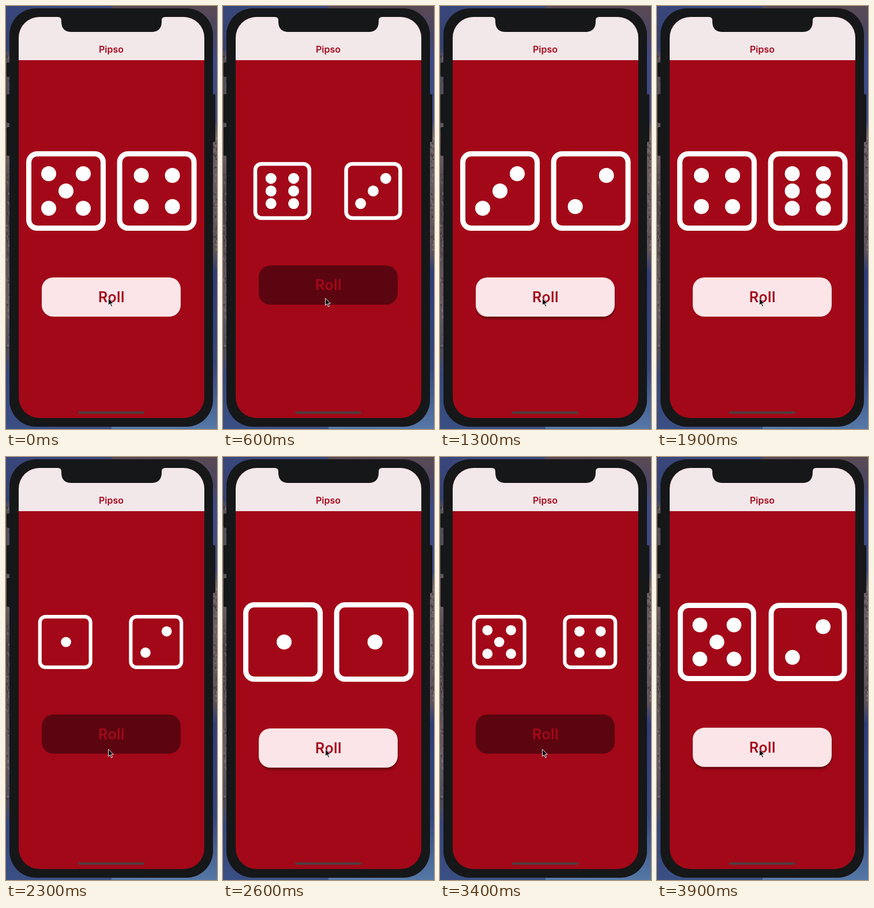
An HTML page that plays this animation: 366 by 734 pixels, repeating every 4 s.

```html
<!DOCTYPE html>
<html lang="en">
<head>
<meta charset="utf-8">
<title>Dice roller</title>
<style>
  html, body { margin: 0; width: 100%; height: 100%; overflow: hidden; background: #161718; }
  svg { display: block; width: 100vw; height: 100vh; }
  text { font-family: Inter, Roboto, "Liberation Sans", sans-serif; font-weight: 600; text-anchor: middle; fill: #a5081b; }
</style>
</head>
<body>
<svg viewBox="0 0 366 734" xmlns="http://www.w3.org/2000/svg">
  <defs>
    <linearGradient id="left" x2="0" y2="1">
      <stop offset="0" stop-color="#3a477c"/>
      <stop offset=".1" stop-color="#34406f"/>
      <stop offset=".12" stop-color="#55525c"/>
      <stop offset=".27" stop-color="#4c4a55"/>
      <stop offset=".3" stop-color="#77696f"/>
      <stop offset=".45" stop-color="#4a4248"/>
      <stop offset=".7" stop-color="#655c64"/>
      <stop offset=".82" stop-color="#4d4a5c"/>
      <stop offset=".87" stop-color="#35467f"/>
      <stop offset="1" stop-color="#3a4f84"/>
    </linearGradient>
    <linearGradient id="right" x2="0" y2="1">
      <stop offset="0" stop-color="#5a4a54"/>
      <stop offset=".06" stop-color="#4a4664"/>
      <stop offset=".12" stop-color="#3d4a86"/>
      <stop offset=".27" stop-color="#3f4a80"/>
      <stop offset=".3" stop-color="#6f6168"/>
      <stop offset=".58" stop-color="#5e535c"/>
      <stop offset=".63" stop-color="#2f3d78"/>
      <stop offset=".85" stop-color="#35477f"/>
      <stop offset="1" stop-color="#5578a6"/>
    </linearGradient>
    <clipPath id="screen"><rect x="22" y="19" width="322" height="696" rx="36"/></clipPath>
    <filter id="blur" x="-10%" y="-30%" width="120%" height="160%"><feGaussianBlur stdDeviation="2"/></filter>
  </defs>

  <rect width="183" height="734" fill="url(#left)"/>
  <rect x="183" width="183" height="734" fill="url(#right)"/>
  <g id="rock"></g>

  <g fill="#161718">
    <rect x="1" y="98" width="8" height="25" rx="2"/>
    <rect x="1" y="153" width="8" height="50" rx="2"/>
    <rect x="1" y="210" width="8" height="50" rx="2"/>
    <rect x="355" y="153" width="8" height="83" rx="2"/>
    <rect x="6" y="4" width="353" height="726" rx="46"/>
  </g>

  <g clip-path="url(#screen)">
    <rect x="22" y="19" width="322" height="696" fill="#a20818"/>
    <rect x="22" y="19" width="322" height="75" fill="#f2e7e9"/>
    <path d="M90 18v1q6 0 6 6v2q0 18 18 18h138q18 0 18-18v-2q0-6 6-6v-1z" fill="#161718"/>
    <text x="182.5" y="81" font-size="16">Pipso</text>
    <g id="dice" fill="#fff"></g>
    <g id="button">
      <rect id="shadow" x="-119" y="-30" width="239" height="67" rx="20" fill="#2a0006" filter="url(#blur)"/>
      <rect id="face" x="-120.5" y="-34" width="241" height="68" rx="20"/>
      <text x=".5" y="9" font-size="25" letter-spacing=".4">Roll</text>
    </g>
    <rect x="125" y="703.5" width="115" height="4" rx="2" fill="#4a4041"/>
  </g>

  <path d="M177.5 507v12.5l2.9-2.7 2.2 5 2-.9-2.1-4.8h3.9z" fill="#0c0c0c" stroke="#fff" stroke-width=".9" stroke-linejoin="round"/>
</svg>
<script>
const NS = "http://www.w3.org/2000/svg";
const LOOP = 4000, STEP = 100, HALF = 210;
const BIG = 138, SMALL = 94, MID_Y = 321;
const LIGHT = [252, 229, 232], DARK = [91, 5, 16];

// Each press: start time, left value, right value.
const presses = [
  [310, 6, 3], [768, 3, 2], [1320, 4, 6], [2090, 1, 2],
  [2600, 1, 1], [3190, 5, 4], [3895, 5, 2]
];

const byId = id => document.getElementById(id);
const clamp = x => Math.min(1, Math.max(0, x));
const ramp = (x, from, to) => clamp((x - from) / (to - from));

function add(parent, tag, attrs) {
  const el = document.createElementNS(NS, tag);
  for (const key in attrs) el.setAttribute(key, attrs[key]);
  return parent.appendChild(el);
}

function pips(n) {
  const a = n === 3 || n === 5 ? 30 : 27;
  const b = n === 6 ? 30 : a;
  const list = [];
  if (n % 2) list.push([n === 1 ? 2 : 0, 0]);
  if (n > 1) list.push([-a, b], [a, -b]);
  if (n > 3) list.push([-a, -b], [a, b]);
  if (n === 6) list.push([-a, 0], [a, 0]);
  return list;
}

function makeDie(baseX) {
  const group = add(byId("dice"), "g", {});
  add(group, "rect", { x: -64.5, y: -64.5, width: 129, height: 129, rx: 14.5,
    fill: "none", stroke: "#fff", "stroke-width": 9 });
  const dots = add(group, "g", {});
  let shown = 0;
  return (value, size) => {
    const x = baseX + 0.03 * size;
    group.setAttribute("transform", `translate(${x} ${MID_Y}) scale(${size / BIG})`);
    if (value === shown) return;
    shown = value;
    dots.replaceChildren();
    for (const [cx, cy] of pips(value)) add(dots, "circle", { cx, cy, r: 13 });
  };
}

function paintRock() {
  let seed = 7;
  const rand = () => (seed = seed * 16807 % 2147483647) / 2147483647;
  for (let i = 0; i < 150; i++) {
    const onLeft = i % 2;
    add(byId("rock"), "rect", {
      x: (onLeft ? 0 : 359) + rand() * 6,
      y: onLeft ? 85 + rand() * 510 : 205 + rand() * 220,
      width: 1 + rand() * 2, height: 1 + rand() * 4,
      fill: rand() < 0.5 ? "#2c2930" : "#8b7e84", opacity: 0.55
    });
  }
}

const drawLeft = makeDie(99.9), drawRight = makeDie(257.5);

function draw(t) {
  let left = 5, right = 4, shrink = 0, dark = 0, lift = 0;
  for (const [start, a, b] of presses) {
    const p = t - start;
    lift = Math.max(lift, ramp(p, -40, -20) * (1 - ramp(p, 20, 120)));
    if (p < 0) continue;
    [left, right] = [a, b];
    shrink = 1 - Math.min(1, Math.abs(p / HALF - 1)) ** 2;
    dark = ramp(p, 140, 200) * (1 - ramp(p, 290, 390));
  }
  const size = BIG - (BIG - SMALL) * shrink;
  drawLeft(left, size);
  drawRight(right, size);
  byId("button").setAttribute("transform", `translate(182.5 ${MID_Y + 108.1 + 0.55 * size})`);
  byId("face").setAttribute("fill", `rgb(${LIGHT.map((c, i) => Math.round(c + (DARK[i] - c) * dark))})`);
  byId("shadow").setAttribute("opacity", 0.6 * lift);
}

function tick() {
  const t = performance.now() % LOOP;
  draw(Math.floor(t / STEP) * STEP);
  requestAnimationFrame(tick);
}

paintRock();
tick();
</script>
</body>
</html>
```
